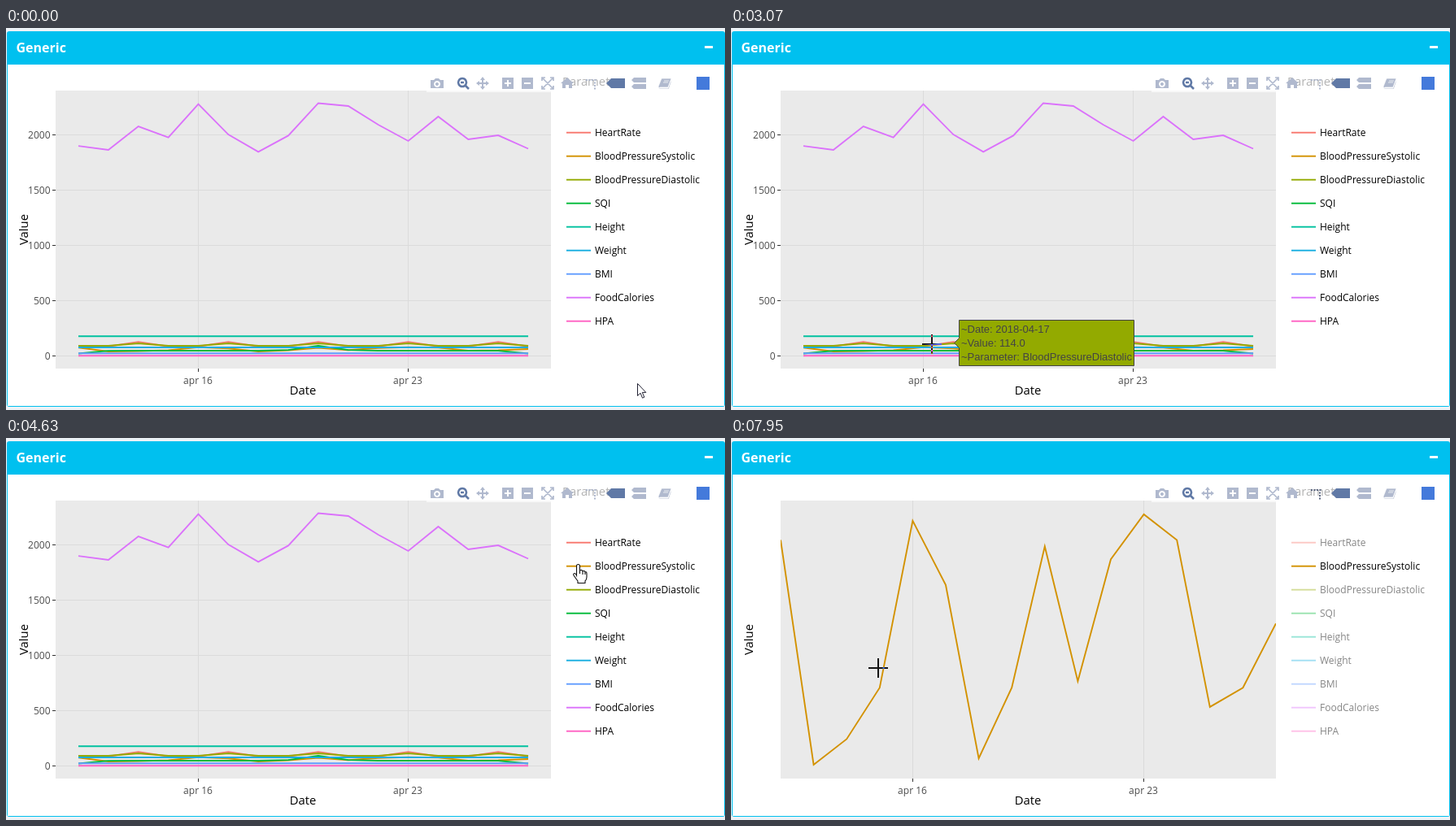
An HTML page with a canvas that plays this animation: 884x470 px, repeating every 8 s.

```html
<!DOCTYPE html>
<html>
<head>
<meta charset="utf-8">
<style>
html, body { margin: 0; width: 100%; height: 100%; overflow: hidden; background: #eef2f6; }
canvas { display: block; }
</style>
</head>
<body>
<canvas id="stage" width="884" height="470"></canvas>
<script>
const ctx = document.getElementById('stage').getContext('2d');
const LOOP = 8000, ISOLATE = 5180, AUTOSCALE = 6780;
const PLOT = { l: 61, t: 77, r: 670, b: 419 };
const OPEN = '"Open Sans", sans-serif', ARIAL = '"Liberation Sans", Arial, sans-serif';
const LIGHT = '#b0b9ce', DARK = '#6079a6';

// Values by day, day 0 being April 12
const systolic = [75, 40, 44, 52, 78, 68, 41, 52, 74, 53, 72, 79, 75, 49, 52, 62];
const calories = [1900, 1864, 2077, 1977, 2279, 2003, 1846, 1993, 2287, 2261, 2092, 1945, 2165, 1960, 1996, 1875];
const threeDay = (mean, swing) => i => mean + swing * Math.cos(2 * Math.PI * (i - 2) / 3);
const quality = i => 48 + 44 * Math.exp(-2 * (i - 8) ** 2) - 26 * ((i - 7.5) / 7.5) ** 20;

const series = [
  ['HeartRate', '#f8766d', threeDay(100, 28)],
  ['BloodPressureSystolic', '#d39200', i => systolic[i]],
  ['BloodPressureDiastolic', '#93aa00', threeDay(99, 15)],
  ['SQI', '#00ba38', quality],
  ['Height', '#00c19f', () => 178.5],
  ['Weight', '#17aee0', () => 77],
  ['BMI', '#619cff', () => 23.5],
  ['FoodCalories', '#db72fb', i => calories[i]],
  ['HPA', '#ff61c3', () => 2]
].map(([name, color, value]) => ({ name, color, value }));
const ISOLATED = series[1], days = [...systolic.keys()];

// start, end, series, day
const hovers = [
  [1060, 1220, 'FoodCalories', 3], [1290, 1690, 'FoodCalories', 2], [1690, 2150, 'FoodCalories', 3],
  [2380, 2990, 'Height', 2], [2990, 3300, 'BloodPressureDiastolic', 5],
  [3300, 3600, 'BMI', 6], [3850, 4010, 'Height', 11]
];

// Pointer moves: start, end, x, y
const START = [776, 437];
const moves = [
  [450, 1060, 181, 145], [1140, 1220, 167, 142], [1220, 1290, 178, 143], [2070, 2380, 172, 380],
  [2690, 3460, 324, 398], [3530, 3930, 550, 350], [4010, 4310, 749, 147], [4410, 4630, 703, 156],
  [5790, 6320, 671, 61], [7260, 7720, 118, 250], [7720, 7950, 181, 283]
];

const dayX = i => 89 + 36.87 * i;
const valueY = v => 403.5 - .136 * v;

function text(str, x, y, size, color, { align = 'left', family = OPEN, weight = '' } = {}) {
  ctx.font = `${weight} ${size}px ${family}`;
  ctx.fillStyle = color;
  ctx.textAlign = align;
  ctx.fillText(str, x, y);
}
function rect(x, y, w, h, color) {
  ctx.fillStyle = color;
  ctx.fillRect(x, y, w, h);
}
function line(points, color) {
  ctx.beginPath();
  points.forEach(p => ctx.lineTo(...p));
  ctx.strokeStyle = color;
  ctx.lineWidth = 1.9;
  ctx.stroke();
}
function shape(d, x, y, fill, stroke, width = 1) {
  const p = new Path2D(d);
  ctx.save();
  ctx.translate(x, y);
  if (fill) { ctx.fillStyle = fill; ctx.fill(p, 'evenodd'); }
  if (stroke) { ctx.strokeStyle = stroke; ctx.lineWidth = width; ctx.stroke(p); }
  ctx.restore();
}
function roundBox(x, y, w, h, radius, color) {
  ctx.beginPath();
  ctx.roundRect(x, y, w, h, radius);
  ctx.fillStyle = color;
  ctx.fill();
}

function panel() {
  rect(0, 0, 884, 470, '#eef2f6');
  roundBox(1, 4, 883, 462, 3, '#00c0ef');
  rect(2, 45, 881, 420, '#fff');
  text('Generic', 12.5, 30, 16, '#fff', { weight: 'bold' });
  rect(859, 22, 10, 3, '#fff');
}

function modebar(scaled) {
  rect(517, 58, 357, 21, 'rgba(255,255,255,.7)');
  const y = 68;
  shape('M-8-4h4l2-2h4l2 2h4v10h-16z M0-3a4 4 0 1 0 .1 0z M0-1a2 2 0 1 1-.1 0z', 530, y, LIGHT);
  shape('M-1-6a5 5 0 1 0 .1 0z M3 3l4 4 M-3-1h4', 562, y, null, DARK, 2.6);
  shape('M0-8l3 4h-2v3h3v-2l4 3-4 3v-2h-3v3h2l-3 4-3-4h2v-3h-3v2l-4-3 4-3v2h3v-3h-2z', 586, y, LIGHT);
  shape('M-7-7h14v14h-14z M-1-4h2v3h3v2h-3v3h-2v-3h-3v-2h3z', 617, y, LIGHT);
  shape('M-7-7h14v14h-14z M-4-1h8v2h-8z', 641, y, LIGHT);
  shape('M-7-3v-4h4 M3-7h4v4 M7 3v4h-4 M-3 7h-4v-4 M-6-6l12 12 M6-6l-12 12', 666, y, null, LIGHT, 1.7);
  shape('M-8 0l8-7 8 7h-2v6h-4v-4h-4v4h-4v-6z', 690, y, LIGHT);
  const spike = scaled ? '#5d6882' : LIGHT;
  for (let i = 0; i < 4; i++) {
    rect(713 + i * 3.5, 63, 2, 2, spike);
    if (i) rect(723, 63 + i * 3.5, 2, 2, spike);
  }
  shape('M-11 0l6-6h17v12h-17z', 749, y, DARK);
  shape('M-9-4l3-3h15v6h-15z M-9 4l3-3h15v6h-15z', 778, y, LIGHT);
  shape('M-4-6h12l-4 11h-10l-1 1h11l3-9 1 1-3 9h-12l-1-3z M-1-3h6 M-2-1h6', 810, y, LIGHT, '#fff', .7);
  rect(849, 60, 16, 16, '#447adb');
}

function chart(isolated, scaled) {
  const { l, t, r, b } = PLOT;
  const px = scaled ? i => l + 40.6 * i : dayX;
  const py = scaled ? v => 402 - 7.9 * (v - 40) : valueY;
  rect(l, t, r - l, b - t, '#eaeaea');
  for (const date of [16, 23]) {
    const x = Math.floor(px(date - 12));
    rect(x, t, 1, b - t, '#dbdbdb');
    rect(x, b, 1, 4, '#333');
    text(`apr ${date}`, x, 438, 12, '#4d4d4d', { align: 'center' });
  }
  if (!scaled) for (let v = 0; v <= 2000; v += 500) {
    const y = Math.floor(py(v));
    rect(l, y, r - l, 1, '#dbdbdb');
    rect(l - 4, y, 4, 1, '#333');
    text(v, 54.5, y + 5, 12, '#4d4d4d', { align: 'right' });
  }
  text('Date', 365, 451, 14.8, '#000', { align: 'center' });
  ctx.save();
  ctx.translate(27, 248);
  ctx.rotate(-Math.PI / 2);
  text('Value', 0, 0, 14.8, '#000', { align: 'center' });
  ctx.restore();

  ctx.save();
  ctx.beginPath();
  ctx.rect(l, t, r - l, b - t);
  ctx.clip();
  for (const s of isolated ? [ISOLATED] : series) line(days.map(i => [px(i), py(s.value(i))]), s.color);
  ctx.restore();
}

function legend(isolated) {
  series.forEach((s, n) => {
    const y = 129 + 29 * n, off = isolated && s !== ISOLATED;
    ctx.globalAlpha = off ? .4 : 1;
    line([[689, y - .3], [719, y - .3]], s.color);
    ctx.globalAlpha = 1;
    text(s.name, 724, y + 4, 12, off ? '#868686' : '#000');
  });
}

function hoverLabel([, , name, day]) {
  const { color, value } = series.find(s => s.name === name);
  const v = value(day);
  const rows = [`~Date: 2018-04-${12 + day}`, `~Value: ${v.toFixed(1)}`, `~Parameter: ${name}`];
  const x = Math.ceil(dayX(day)) + .5, y = Math.floor(valueY(v)) + .5;
  const mid = Math.min(y, PLOT.b - 27.5) - y;
  ctx.font = `13px ${ARIAL}`;
  const w = Math.round(Math.max(...rows.map(row => ctx.measureText(row).width)) + 5.5);
  shape(`M0 0L6 ${mid + 6}V${mid + 28}h${w}v-56H6V${mid - 6}Z`, x, y, color, '#444');
  rows.forEach((row, i) => text(row, x + 8.5, y + mid - 12.5 + 17 * i, 13, '#444', { family: ARIAL }));
}

function buttonHint() {
  shape('M0 0l6 6h-12z', 666, 74, '#69738a');
  roundBox(609, 80, 75, 28, 2, '#69738a');
  text('Autoscale', 646.5, 98, 12, '#fff', { align: 'center' });
}

function cursorAt(t) {
  let [x, y] = START;
  for (const [start, end, toX, toY] of moves) {
    const f = Math.min(1, Math.max(0, (t - start) / (end - start)));
    x += (toX - x) * f;
    y += (toY - y) * f;
  }
  return [Math.round(x), Math.round(y)];
}

function cursor(x, y) {
  const { l, t, r, b } = PLOT;
  if (x >= l && x <= r && y >= t && y <= b) {
    // inverts whatever lies below
    ctx.globalCompositeOperation = 'difference';
    rect(x - 12, y - 1, 24, 2, '#fff');
    rect(x - 1, y - 12, 2, 11, '#fff');
    rect(x - 1, y + 1, 2, 11, '#fff');
    ctx.globalCompositeOperation = 'source-over';
  } else if (y < t || x > 685 && y < 375) {
    shape('M-1.5 13V1.5Q-1.5-.5 .5-.5T2.5 1.5V7Q5 5.5 6 8 8 6.5 9 9 11 8 11 11V15Q11 18 9 20V22.5H0V20Q-3 16-5 13-6 11-4 10.5-2.5 10.5-1.5 13Z M2.5 7V11 M6 8V12 M9 9V12',
      x, y, '#fff', '#111', 1.1);
  } else {
    shape('M.5 .5V15.5L4 12.2 6.5 18.2 8.8 17.2 6.3 11.4H10.8Z', x, y, '#fff', '#223');
  }
}

function draw(now) {
  const t = now % LOOP, scaled = t >= AUTOSCALE;
  panel();
  text('Parameter', 684, 71, 14.8, '#000');
  chart(t >= ISOLATE + 70, scaled);
  legend(t >= ISOLATE);
  modebar(scaled);
  const hover = hovers.find(([start, end]) => t >= start && t < end);
  if (hover) hoverLabel(hover);
  if (t >= 6280 && t < 7300) buttonHint();
  cursor(...cursorAt(t));
  requestAnimationFrame(() => draw(performance.now()));
}
draw(0);
</script>
</body>
</html>
```
